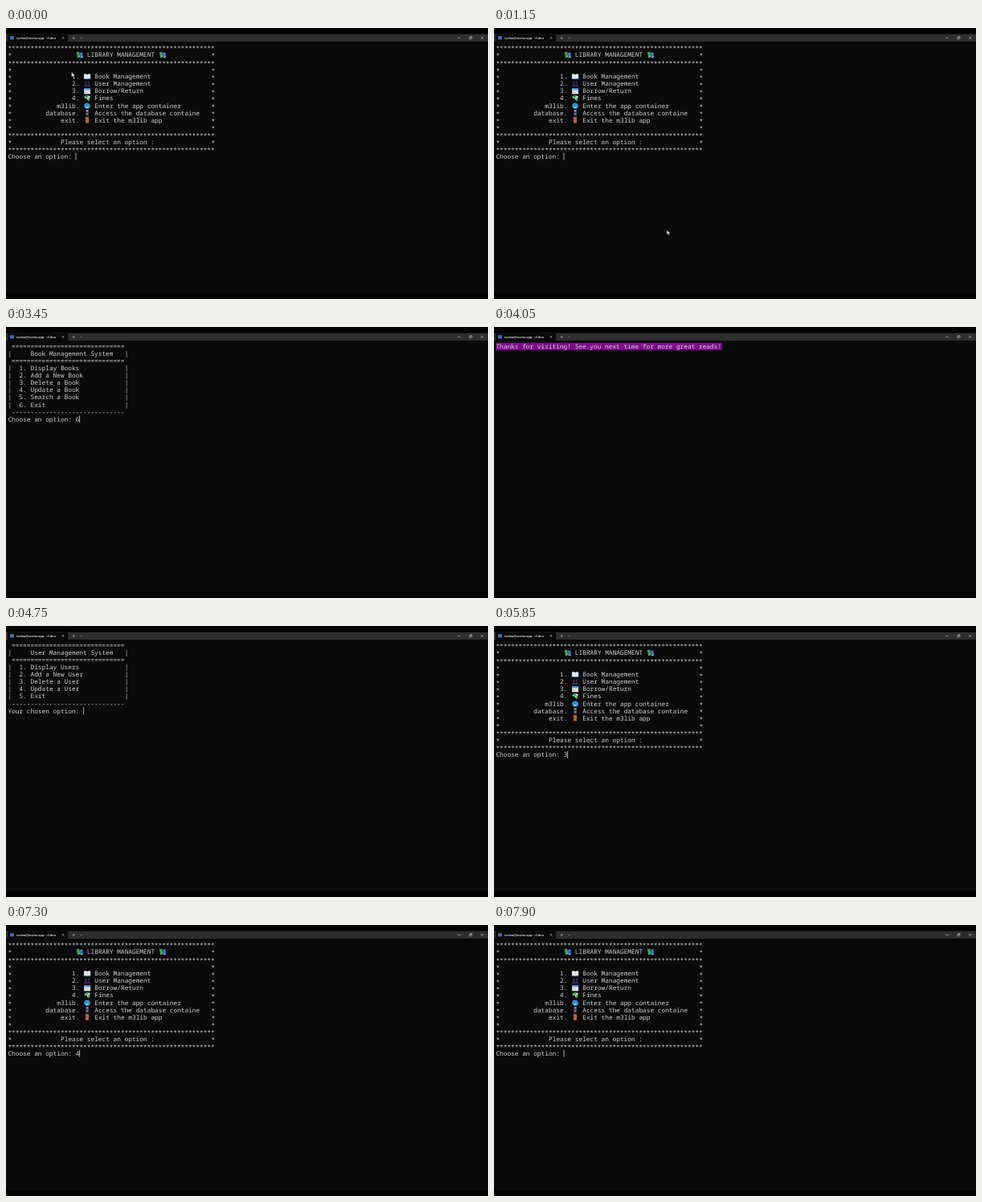
Animation of 600 by 338 pixels, one loop 8 s. Source, as an HTML page:

```html
<!DOCTYPE html>
<html lang="en">
<head>
<meta charset="utf-8">
<title>Library terminal</title>
<style>
  html, body { margin: 0; width: 100%; height: 100%; overflow: hidden; background: #000; }
  svg { display: block; width: 100vw; height: 100vh; }
  text { white-space: pre; text-rendering: geometricPrecision; }
  .term { font: 7.815px "Noto Sans Mono", "DejaVu Sans Mono", monospace; fill: #d2d2d2; }
  .tab { font: 600 3.75px "Open Sans", "Noto Sans", sans-serif; fill: #f2f2f2; }
  .line { fill: none; stroke: #c8c8c8; stroke-width: .6; }
</style>
</head>
<body>
<svg id="stage" viewBox="0 0 600 338">
  <rect width="600" height="338" fill="#000"/>
  <rect y="7.6" width="600" height="9.6" fill="#2e2e2e"/>
  <rect y="17" width="600" height="314" fill="#0a0a0a"/>
  <path d="M2 17.2V9.6q0-1.6 1.6-1.6H75.6q1.6 0 1.6 1.6V17.2z" fill="#0a0a0a"/>
  <rect x="5.2" y="10.2" width="4.6" height="4.2" fill="#3d70c4"/>
  <text id="title" class="tab" x="13" y="13.6"></text>
  <path class="line" d="M69.6 11l2.6 2.6m0-2.6l-2.6 2.6"/>
  <path class="line" stroke-opacity=".8" d="M82.4 12.3h3.4m-1.7-1.7v3.4M92.6 11.8l1.2 1.1 1.2-1.1"/>
  <path class="line" d="M562.4 12.4h3.4M576.8 11.4h2.4v2.4h-2.4zM577.7 10.6h2.3v2.4M591.2 10.8l3 3m0-3l-3 3"/>
  <g id="screens"></g>
  <rect id="caret" width=".8" height="9" fill="#d2d2d2"/>
  <text id="typed" class="term"></text>
  <path id="mouse" d="M0 0V6l1.4-1.2 1 2.2 1-.5-1-2.1H4.3z" fill="#eee" stroke="#111" stroke-width=".4"/>
</svg>
<script>
const CELL_W = 4.689, CELL_H = 9.07, LOOP = 8000;
const $ = id => document.getElementById(id);
const colX = c => 2.4 + c * CELL_W;
const rowY = r => 19.7 + r * CELL_H;
const baseline = r => rowY(r) + 7.3;

const text = (col, row, s, dy = 0) =>
  `<text class="term" x="${colX(col)}" y="${baseline(row) + dy}">${s}</text>`;
const stars = (col, row, n = 1) => text(col, row, "*".repeat(n), 1.4);
const shape = (fill, d) => `<path fill="${fill}" d="${d}"/>`;

// Small pictures on a 9 by 9 grid
const icons = {
  books: shape("#3fa34d", "M.6 1.6L4 .8 5.4 7 2 8z") + shape("#b7e08a", "M2 7.2l3.2-.8.3.8-3.2.9z") +
         shape("#2f7fd0", "M4.8 2.2L8.2 1.6 9 7.4 5.8 8.4z") + shape("#d9ecf8", "M5.8 7.7L8.9 7l.1.6-3.2.8z"),
  book: shape("#3b78b8", "M.4 2H9v6H.4z") + shape("#f1eee8", "M.8 1.6Q3 .8 4.7 2 6.4.8 8.6 1.6V7Q6.4 6.4 4.7 7.4 3 6.4.8 7z") +
        shape("#a9a9a9", "M4.5 2h.4v5.2h-.4z"),
  users: shape("#35294f", "M1.4 3a1.5 1.5 0 1 1 3 0a1.5 1.5 0 1 1-3 0M5.2 3a1.5 1.5 0 1 1 3 0a1.5 1.5 0 1 1-3 0M.6 8q0-3 2.3-3t2.2 3zM4.6 8q0-3 2.2-3T9 8z"),
  calendar: shape("#e9eef2", "M.8 1H8.6V8.2H.8z") + shape("#3c8ed0", "M.8 1H8.6V3H.8z") +
            shape("#8aa9bf", "M2 4h1.2v1H2zM4.1 4h1.2v1H4.1zM6.2 4h1.2v1H6.2zM2 6h1.2v1H2zM4.1 6h1.2v1H4.1z"),
  money: shape("#dfeee2", "M4.4.8L8.6 2 7 5zM1 2.2l3 .2-1.6 3z") + shape("#3aa65a", "M2 1.8L4.4.8 8.4 6.6 6 8.4z") +
         shape("#a6dfae", "M4.2 4a1 1 0 1 1 2 1.2a1 1 0 1 1-2-1.2"),
  whale: shape("#2c9bd6", "M.8 5Q1 1 5 1.2 8.8 1.8 8.6 5.4 8 8.6 4.6 8.2 1.2 8 .8 5z") +
         shape("#d4eef8", "M2 6.2Q4.4 7 6.2 5.6 6 7.8 4 7.6 2.6 7.4 2 6.2z") + shape("#114b78", "M3.2 3.4h1v1h-1zM6 2l2.4-.6L7.6 3z"),
  store: shape("#4c5973", "M3 .6H6.6V8.4H3z") + shape("#a9b9d6", "M3.8 1.4H5.8V2.6H3.8zM4.2 5.4h1.2v1.4H4.2z") +
         shape("#232b3b", "M3 3.4H6.6v.7H3zM3 7H6.6v.6H3z"),
  door: shape("#7b3f22", "M2.4.6H6.8V8.4H2.4z") + shape("#c36a38", "M3 1.2H6.2V4H3zM3 4.7H6.2V7.8H3z") + shape("#f0c860", "M5.5 4.1h.7v.8h-.7z")
};
const icon = (name, col, row) =>
  `<g transform="translate(${colX(col) + .2} ${rowY(row)})">${icons[name]}</g>`;

function mainMenu() {
  const items = [
    ["1.", "book", "Book Management"], ["2.", "users", "User Management"],
    ["3.", "calendar", "Borrow/Return"], ["4.", "money", "Fines"],
    ["m3lib.", "whale", "Enter the app container"],
    ["database.", "store", "Access the database containe"],
    ["exit.", "door", "Exit the m3lib app"]
  ];
  let out = [0, 2, 12, 14].map(r => stars(0, r, 55)).join("");
  for (const r of [1, 3, 4, 5, 6, 7, 8, 9, 10, 11, 13]) out += stars(0, r) + stars(54, r);
  out += icon("books", 18, 1) + text(21, 1, "LIBRARY MANAGEMENT") + icon("books", 40, 1);
  items.forEach(([key, pic, label], i) => {
    out += text(19 - key.length, 4 + i, key) + icon(pic, 20, 4 + i) + text(23, 4 + i, label);
  });
  return out + text(14, 13, "Please select an option :") + text(0, 15, "Choose an option: ");
}

function subMenu(title, items, prompt) {
  const rule = (row, ch) => text(1, row, ch.repeat(30));
  const boxed = (row, col, s) => text(0, row, "|") + text(col, row, s) + text(31, row, "|");
  const end = 3 + items.length;
  return rule(0, "=") + boxed(1, 6, title) + rule(2, "=") +
    items.map((s, i) => boxed(3 + i, 3, `${i + 1}. ${s}`)).join("") +
    rule(end, "-") + text(0, end + 1, prompt);
}

function finesTable() {
  const heads = ["fine_id", "user_id", "book_id", "amount", "due_date", "paid"];
  const widths = [9, 11, 11, 10, 14, 10];
  return text(0, 0, heads.map((h, i) => (" " + h).padEnd(widths[i])).join("|")) +
    text(0, 1, widths.map(w => "-".repeat(w)).join("+")) + text(0, 2, "(0 rows)");
}

const screens = {
  main: mainMenu(),
  book: subMenu("Book Management System",
    ["Display Books", "Add a New Book", "Delete a Book", "Update a Book", "Search a Book", "Exit"],
    "Choose an option: "),
  user: subMenu("User Management System",
    ["Display Users", "Add a New User", "Delete a User", "Update a User", "Exit"],
    "Your chosen option: "),
  borrow: subMenu("Borrow/Return System",
    ["Borrow a Book", "Return a Book", "Display Borrowed", "Display Returned",
     "Search by User", "Search by Book", "Update a Record", "Exit"],
    "Choose an option: "),
  bye: `<rect x="2.4" y="${rowY(0)}" width="${60 * CELL_W}" height="${CELL_H}" fill="#7f0a8e"/>` +
    text(0, 0, "Thanks for visiting! See you next time for more great reads!"),
  fines: finesTable()
};
const prompts = { main: [18, 15], book: [18, 10], user: [20, 9], borrow: [18, 12] };

// start time, screen, typed key, caret visible
const steps = [
  [0, "main", "", 1], [400, "main", "", 0], [950, "main", "", 1], [1480, "main", "", 0],
  [2000, "main", "", 1], [2250, "main", "1", 1],
  [2550, "book", "", 1], [3050, "book", "", 0], [3450, "book", "6", 1],
  [3600, "bye", "", 0],
  [4100, "main", "", 1], [4400, "main", "2", 1],
  [4550, "user", "", 1], [4850, "user", "", 0], [5200, "user", "5", 1],
  [5300, "main", "", 1], [5850, "main", "3", 1],
  [5900, "borrow", "", 1], [6100, "borrow", "", 0], [6400, "borrow", "8", 1],
  [6500, "main", "", 1], [7050, "main", "", 0], [7300, "main", "4", 1],
  [7350, "fines", "", 0], [7750, "main", "", 1]
];

// time, x, y of the pointer tip
const trail = [[50, 81.5, 55], [850, 218, 246], [1100, 218, 246], [1350, 192, 300], [1800, 103, 134], [2250, 103, 134]];

function pointerAt(t) {
  const i = trail.findIndex(p => t < p[0]);
  if (i <= 0) return trail[0].slice(1);
  const [t0, x0, y0] = trail[i - 1], [t1, x1, y1] = trail[i];
  const u = (t - t0) / (t1 - t0), e = u * u * (3 - 2 * u);
  return [x0 + (x1 - x0) * e, y0 + (y1 - y0) * e];
}

$("title").textContent = "tavino@tavino-app: ~/Libra";
$("screens").innerHTML = Object.entries(screens).map(([k, s]) => `<g id="s-${k}">${s}</g>`).join("");
const show = (el, on) => el.setAttribute("visibility", on ? "visible" : "hidden");

function draw(t) {
  const [, screen, key, caretOn] = steps.filter(s => s[0] <= t).pop();
  for (const k in screens) show($("s-" + k), k === screen);
  const [col, row] = prompts[screen] || [0, 0];
  $("typed").textContent = key;
  $("typed").setAttribute("x", colX(col));
  $("typed").setAttribute("y", baseline(row));
  $("caret").setAttribute("x", colX(col + key.length) - .2);
  $("caret").setAttribute("y", rowY(row));
  show($("caret"), caretOn);
  show($("mouse"), t < 2250);
  if (t < 2250) $("mouse").setAttribute("transform", `translate(${pointerAt(t)})`);
}

const start = performance.now();
function frame() {
  draw((performance.now() - start) % LOOP);
  requestAnimationFrame(frame);
}
draw(0);
requestAnimationFrame(frame);
</script>
</body>
</html>
```
